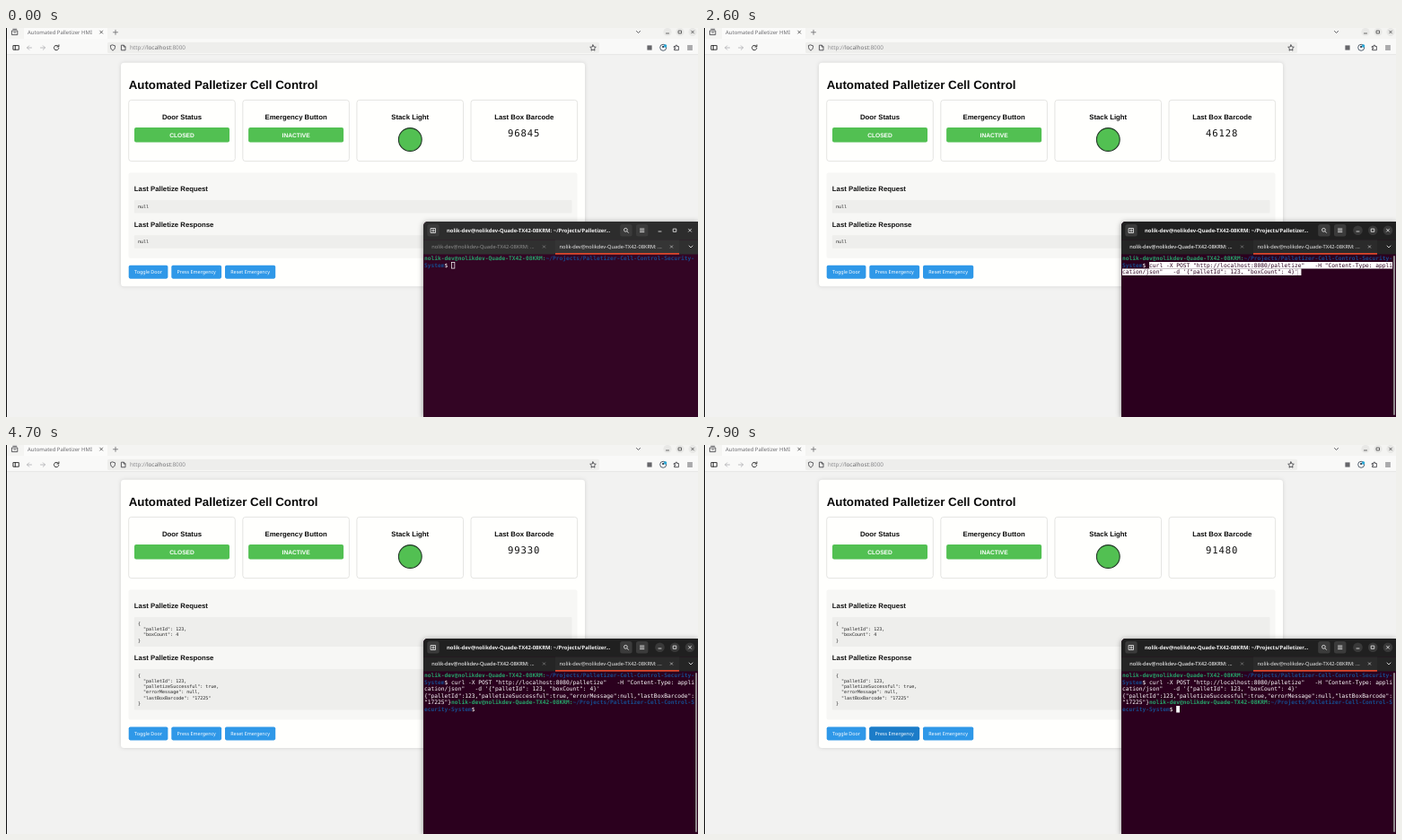
Write an HTML page that moves like this. It is 771x434 px and loops after 8 s.

```html
<!DOCTYPE html>
<html lang="en">
<head>
<meta charset="utf-8">
<title>Automated Palletizer HMI</title>
<style>
html, body { margin: 0; width: 100%; height: 100%; overflow: hidden; background: #f2f2f1; }
svg { display: block; width: 771px; height: 434px; }
text { white-space: pre; text-rendering: geometricPrecision; }
.ui { font-family: "Noto Sans", sans-serif; }
.page { font-family: "Liberation Sans", Arial, sans-serif; font-weight: bold; }
.mono { font-family: "DejaVu Sans Mono", monospace; }
.mid { text-anchor: middle; }
.line { fill: none; stroke-width: .9; stroke-linecap: round; stroke-linejoin: round; }
</style>
</head>
<body>
<svg id="stage" viewBox="0 0 771 434"></svg>
<script>
const LOOP = 8000;
const stage = document.getElementById('stage');

function add(parent, tag, attrs, text) {
  const el = document.createElementNS('http://www.w3.org/2000/svg', tag);
  for (const key in attrs) el.setAttribute(key, attrs[key]);
  if (text !== undefined) el.textContent = text;
  return parent.appendChild(el);
}
const group = (parent = stage) => add(parent, 'g', {});
const rect = (p, x, y, width, height, fill, rx = 0, more = {}) =>
  add(p, 'rect', { x, y, width, height, fill, rx, ...more });
const text = (p, x, y, str, size, fill, cls, more = {}) =>
  add(p, 'text', { x, y, 'font-size': size, fill, class: cls, ...more }, str);
const line = (p, d, stroke, more = {}) => add(p, 'path', { d, stroke, class: 'line', ...more });
const circle = (p, cx, cy, r, fill, more = {}) => add(p, 'circle', { cx, cy, r, fill, ...more });
const cross = (p, x, y, r, stroke) =>
  line(p, `M${x - r} ${y - r}l${2 * r} ${2 * r}M${x + r} ${y - r}l${-2 * r} ${2 * r}`, stroke);
const chevron = (p, x, y, stroke) => line(p, `M${x - 2} ${y - 1}l2 2l2 -2`, stroke);
const show = (el, on) => el.setAttribute('opacity', +on);

function browser() {
  const g = group(), ink = '#4a4a4f', pale = '#b5b5b8';
  rect(g, 0, 0, 771, 434, '#f2f2f1');
  rect(g, 0, 0, 771, 30, '#f9f9f8');
  rect(g, 0, 0, 771, 12, '#f4f4f2');
  rect(g, 20, 0, 93, 12, '#fbfbfa');
  line(g, 'M1 29.7H771', '#e4e4e2', { 'stroke-width': .6 });
  line(g, 'M6.8 3h6v4.6h-6zM7.8 1.3h4M8.8 5h2', ink);
  text(g, 24, 7.2, 'Automated Palletizer HMI', 5.96, '#6a6a6e', 'ui');
  cross(g, 106.2, 4.6, 1.5, '#555');
  line(g, 'M119.5 4.8h5M122 2.3v5', '#77777a');
  chevron(g, 704.5, 4.5, ink);
  for (const x of [737, 751, 765]) circle(g, x, 4.5, 4.6, '#e8e8e6');
  line(g, 'M735.5 6h3M749.5 3h3v3h-3z', '#555');
  cross(g, 765, 4.5, 1.4, '#555');

  rect(g, 113, 15.8, 548, 12.4, '#eeeeec', 2);
  line(g, 'M8.3 19.6h6v4.6h-6zM10.3 19.6v4.6', '#222', { 'stroke-width': 1.1 });
  line(g, 'M28.5 22h-5m2.2 -2.2l-2.2 2.2l2.2 2.2M38.5 22h5m-2.2 -2.2l2.2 2.2l-2.2 2.2', pale);
  line(g, 'M58.3 20.4A2.7 2.7 0 1 0 58.8 22.6M58.9 18.9v2h-2', '#222');
  line(g, 'M119 19l2.6 .9c0 2.6 -.6 4.2 -2.6 5.2c-2 -1 -2.6 -2.6 -2.6 -5.2z', ink);
  line(g, 'M128.8 19.2h2.6l1.6 1.6v4h-4.2zM131.2 19.4v1.6h1.6', ink);
  const url = text(g, 138, 24.3, 'http://', 6.36, '#8a8a8d', 'ui');
  add(url, 'tspan', { fill: '#6a6a6d' }, 'localhost');
  add(url, 'tspan', {}, ':8000');
  line(g, 'M654 18.9l1 2.1l2.3 .3l-1.7 1.6l.4 2.3l-2 -1.1l-2 1.1l.4 -2.3l-1.7 -1.6l2.3 -.3z', ink);
  rect(g, 714.4, 19.4, 5.2, 5.2, '#66666a');
  circle(g, 732.2, 21.8, 3.5, '#fff', { stroke: '#3b4a5a', 'stroke-width': .9 });
  circle(g, 732.2, 20.9, 1.2, '#3b4a5a');
  circle(g, 734.6, 20, 1.7, '#2aa9d8');
  line(g, 'M744.6 20.5h1.5v-1.2h1.6v1.2h1.7v4.2h-4.8v-1.6h1.2v-1.2h-1.2z', ink);
  line(g, 'M759.5 20h5M759.5 22h5M759.5 24h5', ink);
}

// Panel whose height depends on the two result texts.
function results(request, response) {
  const g = group(), panel = rect(g, 128, 38.8, 517, 0, '#fffffd', 3.5,
    { style: 'filter:drop-shadow(0 .6px 2px #0002)' });
  const section = rect(g, 136.5, 161.5, 500, 0, '#f7f7f5', 2);
  let bottom = 167.2;
  for (const [title, rows] of [['Request', request], ['Response', response]]) {
    const top = bottom + 24.8, height = 8.2 + 6.22 * rows.length;
    text(g, 142.8, bottom + 15.2, 'Last Palletize ' + title, 7.79, '#111', 'page');
    rect(g, 142.8, top, 487.7, height, '#eeeeec', 1);
    rows.forEach((row, i) => text(g, 147, top + 8.9 + 6.22 * i, row, 5, '#222', 'mono'));
    bottom = top + height;
  }
  section.setAttribute('height', bottom + 11 - 161.5);
  panel.setAttribute('height', bottom + 42.6 - 38.8);
  const hover = [['Toggle Door', 136.7, 43.7], ['Press Emergency', 184.3, 55.8],
    ['Reset Emergency', 244, 56.2]].map(([label, x, w]) => {
    rect(g, x, bottom + 19, w, 15, '#2f98e8', 1.8);
    const over = rect(g, x, bottom + 19, w, 15, '#1c7cc8', 1.8, { opacity: 0 });
    text(g, x + w / 2, bottom + 28.5, label, 5.4, '#fff', 'ui mid');
    return over;
  });
  return { g, hover };
}

function cards() {
  const g = group();
  text(g, 136.7, 68.2, 'Automated Palletizer Cell Control', 13.32, '#0a0a0a', 'page');
  ['Door Status', 'Emergency Button', 'Stack Light', 'Last Box Barcode'].forEach((title, i) => {
    const x = 136.7 + 127.1 * i, mid = x + 59.3;
    rect(g, x, 80.4, 118.6, 68.2, '#fffffd', 3, { stroke: '#dededb', 'stroke-width': .8 });
    text(g, mid, 102.1, title, 7.79, '#0a0a0a', 'page mid');
    if (i < 2) {
      rect(g, x + 6.3, 111, 106, 16.5, '#52c052', 2);
      text(g, mid, 121.6, i ? 'INACTIVE' : 'CLOSED', 6.66, '#fff', 'page mid');
    }
  });
  circle(g, 450.3, 124.5, 12.9, '#52c052', { stroke: '#223826', 'stroke-width': 1.1 });
  return text(g, 559, 121, '', 10.65, '#111', 'mono', { 'letter-spacing': .83 });
}

const USER = 'nolik-dev@nolikdev-Quade-TX42-08KRM:';
const PATH = '~/Projects/Palletizer-Cell-Control-Security-System';
const COMMAND = 'curl -X POST "http://localhost:8080/palletize"   -H "Content-Type: application/json"   -d \'{"palletId": 123, "boxCount": 4}\'';
const REPLY = '{"palletId":123,"palletizeSuccessful":true,"errorMessage":null,"lastBoxBarcode":"17225"}';
const COLS = 80, CELL = 3.763, ROW = 7.5, LEFT = 466, TOP = 253.5;

// Writes wrapped text from a cell index and returns the next index.
function write(g, at, str, fill, bold, back) {
  while (str) {
    const col = at % COLS, row = Math.floor(at / COLS), part = str.slice(0, COLS - col);
    const x = LEFT + col * CELL, y = TOP + row * ROW;
    if (back) rect(g, x, y, part.length * CELL, ROW, back);
    text(g, x, y + 5.8, part, 6.25, fill, 'mono', { 'font-weight': bold ? 'bold' : 'normal' });
    at += part.length;
    str = str.slice(part.length);
  }
  return at;
}
function prompt(g, at) {
  at = write(g, at, USER, '#26a269', true);
  at = write(g, at, PATH, '#174a8c', true);
  return write(g, at, '$ ', '#fff');
}
function cursor(g, at, hollow) {
  const x = LEFT + at % COLS * CELL, y = TOP + Math.floor(at / COLS) * ROW;
  return hollow
    ? rect(g, x + .4, y + .4, CELL - .4, ROW - .8, 'none', 0, { stroke: '#fff', 'stroke-width': .7 })
    : rect(g, x, y, CELL, ROW, '#fff');
}

function terminal() {
  const edge = 'M465 434V221.5Q465 216 470.5 216H771V';
  const box = group();
  box.setAttribute('style', 'filter:drop-shadow(0 1px 3px #0006)');
  const layer = (body, head, tabs, current) => {
    const g = group(box);
    add(g, 'path', { d: edge + '434Z', fill: body });
    add(g, 'path', { d: 'M465 236.5V221.5Q465 216 470.5 216H771V236.5Z', fill: head });
    rect(g, 465, 236.5, 306, 16, tabs);
    rect(g, 612, 236.5, 138, 16, current);
    return g;
  };
  layer('#330524', '#2d2d2d', '#303030', '#353535');
  const focus = layer('#2b001e', '#202020', '#252525', '#2b2b2b');
  for (const x of [728.5, 745.2, 762]) circle(focus, x, 225.7, 5.3, '#393939');
  rect(focus, 768, 254, 2, 178, '#918a8e', 1);

  const g = group();
  for (const x of [469.3, 684.2, 702]) rect(g, x, 219, 13.4, 13.4, '#3b3b3b', 2.5);
  line(g, 'M473.5 223.5h5v5h-5zM476 224.7v2.6M474.7 226h2.6', '#ddd', { 'stroke-width': .7 });
  circle(g, 690.4, 225.3, 1.9, 'none', { stroke: '#ddd', 'stroke-width': .9 });
  line(g, 'M691.9 226.8l1.6 1.6M706.5 224h4.4M706.5 225.8h4.4M706.5 227.6h4.4', '#ddd');
  line(g, 'M727 227h3M743.6 224.1h3.2v3.2h-3.2z', '#ddd');
  cross(g, 762, 225.7, 1.5, '#ddd');
  text(g, 491, 227.8, USER + ' ~/Projects/Palletizer...', 5.85, '#f2f2f2', 'ui', { 'font-weight': 'bold' });
  const tab = (p, x, fill) => text(p, x, 246, USER + ' ...', 5.7, fill, 'ui');
  tab(g, 474.3, '#8d8d8d');
  tab(g, 616.5, '#e8e8e8');
  const lit = group();
  tab(lit, 474.3, '#d0d0d0');
  cross(g, 599.5, 244, 1.2, '#777');
  cross(g, 741.5, 244, 1.2, '#aaa');
  chevron(g, 763, 244, '#ddd');
  rect(g, 612, 251, 138, 1.7, '#e2452b');

  // Screens: bare prompt, pasted command, answered command.
  return { focus, lit, screens: [0, 1, 2].map(step => {
    const s = group();
    let at = prompt(s, 0), hollow;
    if (step === 0) hollow = cursor(s, at, true);
    if (step === 1) at = write(s, at, COMMAND, '#2b001e', false, '#fff');
    if (step === 2) {
      write(s, at, COMMAND, '#fff');
      at = prompt(s, write(s, 3 * COLS, REPLY, '#fff'));
    }
    return { g: s, block: cursor(s, at), hollow };
  }) };
}

browser();
const layouts = [
  results(['null'], ['null']),
  results(['{', '  "palletId": 123,', '  "boxCount": 4', '}'],
    ['{', '  "palletId": 123,', '  "palletizeSuccessful": true,', '  "errorMessage": null,',
      '  "lastBoxBarcode": "17225"', '}'])
];
const barcode = cards();
const term = terminal();
rect(stage, 0, 0, 1, 434, '#111');

const FOCUS = 900, PASTE = 1300, ANSWER = 3800;
const CODES = [[0, '96845'], [100, '28316'], [700, '57402'], [1200, '10713'], [2100, '83659'],
  [2600, '46128'], [3100, '71940'], [3700, '94473'], [4300, '30586'], [4700, '99330'],
  [5200, '62817'], [5600, '15294'], [6100, '73585'], [6700, '48062'], [7100, '91480']];
const BLINK = [[0, 1], [2000, 0], [2600, 1], [3200, 0], [3700, 1], [4300, 0], [4900, 1],
  [5600, 0], [6200, 1], [6800, 0], [7300, 1]];
const valueAt = (steps, t) => steps.filter(s => s[0] <= t).pop()[1];
const ramp = (t, from, length) => Math.min(1, Math.max(0, (t - from) / length));

function draw(t) {
  const focus = ramp(t, FOCUS, 250), done = t >= ANSWER;
  const step = done ? 2 : t >= PASTE ? 1 : 0;
  barcode.textContent = valueAt(CODES, t);
  layouts.forEach((l, i) => show(l.g, i === +done));
  show(term.focus, focus);
  show(term.lit, focus);
  term.screens.forEach((s, i) => {
    show(s.g, i === step);
    show(s.block, t >= FOCUS && valueAt(BLINK, t));
    if (s.hollow) show(s.hollow, t < FOCUS);
  });
  const [, press, reset] = layouts[1].hover;
  show(press, ramp(t, 7650, 200));
  show(reset, ramp(t, 7550, 100) * (1 - ramp(t, 7650, 150)));
}

const start = performance.now();
function tick() {
  draw((performance.now() - start) % LOOP);
  requestAnimationFrame(tick);
}
tick();
</script>
</body>
</html>
```
